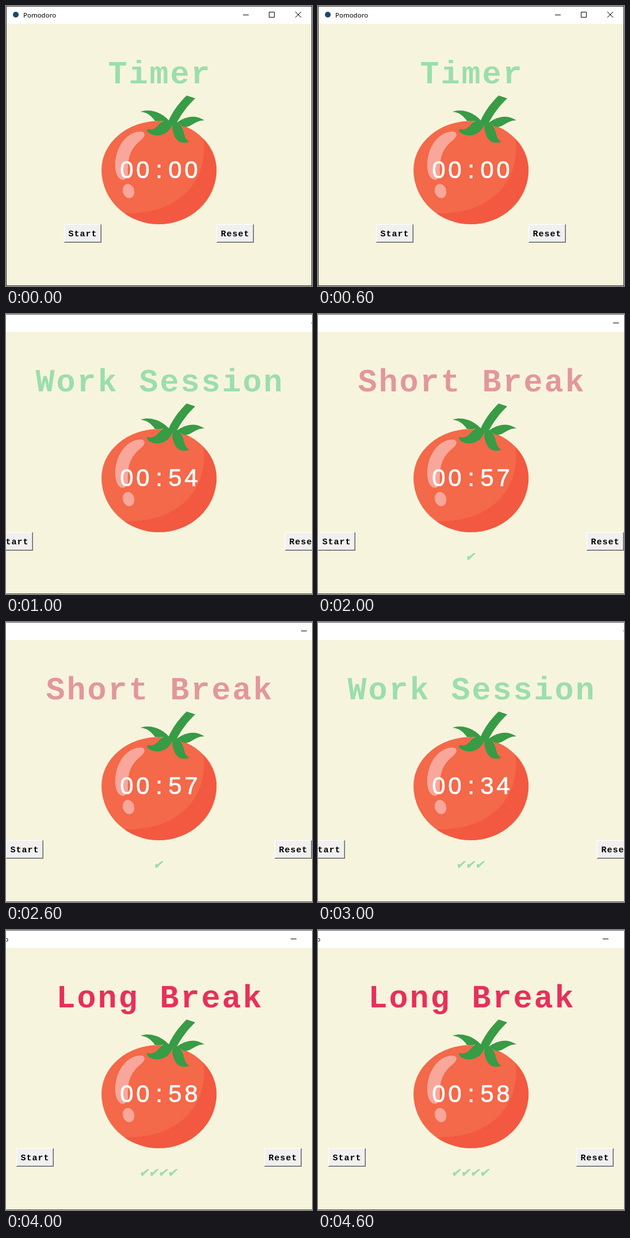
These frames come from a looping animation (532 by 485 pixels, 5 s). An HTML page:

```html
<!DOCTYPE html>
<html lang="en">
<head>
<meta charset="utf-8">
<title>Pomodoro</title>
<style>
  html, body { margin: 0; width: 100%; height: 100%; overflow: hidden; }
  svg { display: block; width: 532px; height: 485px; background: #f7f4dd; }
  .mono { font-family: "Courier New", "Liberation Mono", monospace; font-weight: bold; text-anchor: middle; }
  #title { font-size: 55px; letter-spacing: 3px; }
  #clock { font: 42px "Liberation Sans", Arial, sans-serif; text-anchor: middle; fill: #fff; stroke: #fff; stroke-width: .7px; }
  #checks { font: 19.7px "DejaVu Sans", sans-serif; text-anchor: middle; fill: #9bdeac; stroke: #9bdeac; stroke-width: .9px; }
  .label { font-size: 15px; letter-spacing: 1px; }
  .caption { font: 11.5px "Segoe UI", "Open Sans", sans-serif; }
</style>
</head>
<body>
<svg viewBox="0 0 532 485">
  <defs>
    <g id="button">
      <path fill="#696969" d="M0 0h65v32H0z"/>
      <path fill="#fff" d="M0 0h64v31H0z"/>
      <path fill="#a0a0a0" d="M1 1h63v30H1z"/>
      <path fill="#f0f0f0" d="M1 1h62v29H1z"/>
    </g>
    <path id="body" d="M166 284A100 85 0 0 1 366 284A100 94 0 0 1 166 284z"/>
    <clipPath id="skin"><use href="#body"/></clipPath>
  </defs>

  <path fill="#fff" d="M0 0h532v31H0z"/>
  <path id="edges" fill="none" d="M0 .5h532M0 484.5h532"/>

  <!-- Parts anchored to the left edge of the window -->
  <g id="left">
    <path stroke="#333" d="M.5 0v485"/>
    <circle cx="17" cy="15" r="5" fill="#20456b"/>
    <text class="caption" x="30" y="20">Pomodoro</text>
    <use href="#button" x="101" y="378"/>
    <text class="mono label" x="133.5" y="399">Start</text>
  </g>

  <!-- Parts anchored to the right edge -->
  <g id="right">
    <path stroke="#333" d="M531.5 0v485"/>
    <path fill="none" stroke="#000" d="M412 15.5h10M457.5 10.5h9v9h-9zM503 10l10 10m0-10l-10 10"/>
    <use href="#button" x="366" y="378"/>
    <text class="mono label" x="398.5" y="399">Reset</text>
  </g>

  <!-- Tomato -->
  <use href="#body" fill="#f36949"/>
  <path clip-path="url(#skin)" fill="#f25940" d="M343 229C353 295 308 362 206 359V390H380V229z"/>
  <g fill="#f9a79b">
    <path d="M240 220C242 224 240 227 236 231C216 247 211 262 212 290C211 306 192 306 190 280C188 250 206 222 228 218C234 217 239 217 240 220z"/>
    <ellipse cx="213" cy="320.5" rx="10" ry="12.5" transform="rotate(-15 213 320.5)"/>
  </g>
  <path fill="#389b46" d="M314 155L329 160C316 172 305 187 297 202C312 192 327 187 345 198C327 198 322 212 308 209L301 205C313 215 306 228 319 235C302 242 289 230 289 205C284 222 265 228 252 222C247 220 245 217 245 213C262 217 262 205 274 199L259 199C252 190 247 185 234 183C254 177 272 186 283 198C291 180 302 167 314 155z"/>

  <text id="title" class="mono" x="267.5" y="134"></text>
  <text id="clock" x="210 238 266 294 322" y="298"></text>
  <text id="checks" transform="translate(264.5 427) skewX(-12)"></text>
</svg>
<script>
  const GREEN = "#9bdeac", PINK = "#e2979c", RED = "#e7305b";
  // heading, colour, clock, finished sessions, growth of the window on each side
  const STATES = [
    ["Timer", GREEN, "00:00", 0, 0],
    ["Work Session", GREEN, "00:54", 0, 119],
    ["Short Break", PINK, "00:57", 1, 101],
    ["Work Session", GREEN, "00:34", 3, 119],
    ["Long Break", RED, "00:58", 4, 83],
  ];
  const el = id => document.getElementById(id);
  let shown = -1;

  function draw(now) {
    const step = Math.floor(now / 1000) % STATES.length;
    if (step !== shown) {
      shown = step;
      const [heading, colour, time, done, grow] = STATES[step];
      el("title").textContent = heading;
      el("title").setAttribute("fill", colour);
      el("clock").textContent = time;
      el("checks").textContent = "✔".repeat(done);
      el("left").setAttribute("transform", `translate(${-grow})`);
      el("right").setAttribute("transform", `translate(${grow})`);
      el("edges").setAttribute("stroke", grow ? "#555" : "#333");
    }
    requestAnimationFrame(draw);
  }
  draw(performance.now());
</script>
</body>
</html>
```
